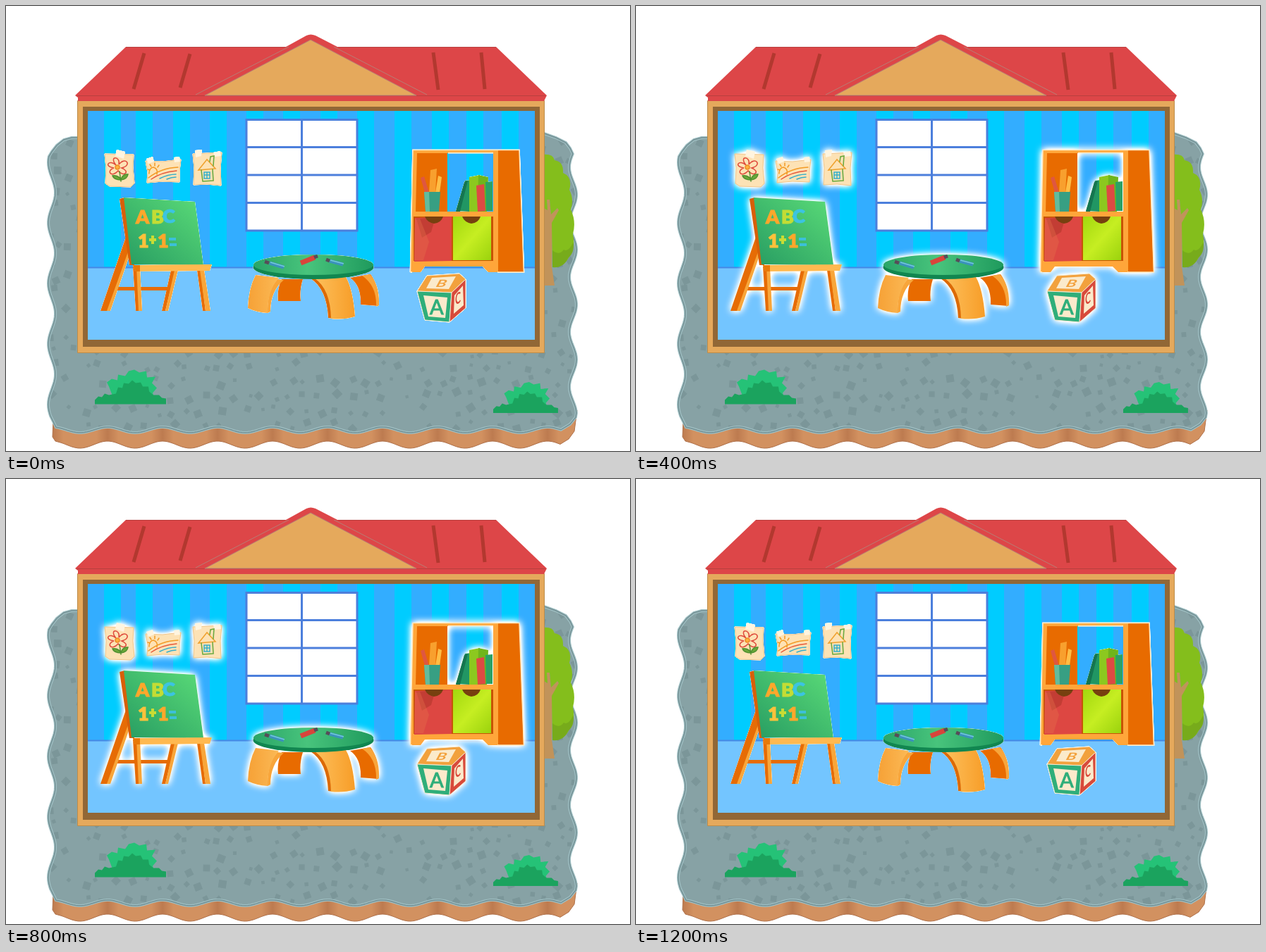
These frames come from a looping animation (885x632 px, 1300 ms). An HTML page:

```html
<!DOCTYPE html>
<html lang="en">
<head>
<meta charset="utf-8">
<title>Classroom</title>
<style>
html, body { margin: 0; width: 100%; height: 100%; overflow: hidden; background: #fff; }
svg { display: block; width: 100%; height: 100%; }
text { font-family: Lato, "Open Sans", sans-serif; font-weight: 900; }
</style>
</head>
<body>
<svg viewBox="0 0 885 632">
<defs>
  <filter id="glow" filterUnits="userSpaceOnUse" x="90" y="140" width="690" height="360" color-interpolation-filters="sRGB">
    <feGaussianBlur id="blur" in="SourceAlpha" stdDeviation=".5"/>
    <feColorMatrix values="0 0 0 0 1  0 0 0 0 1  0 0 0 0 1  0 0 0 2 0"/>
    <feMerge><feMergeNode/><feMergeNode in="SourceGraphic"/></feMerge>
  </filter>
  <linearGradient id="soilFill" gradientUnits="userSpaceOnUse" x1="66" x2="144" spreadMethod="repeat">
    <stop offset="0" stop-color="#bd7b50"/><stop offset=".2" stop-color="#d29160"/>
    <stop offset=".8" stop-color="#d29160"/><stop offset="1" stop-color="#bd7b50"/>
  </linearGradient>
  <linearGradient id="board" x1="0" y1="1" x2="1" y2="0">
    <stop stop-color="#279c62"/><stop offset="1" stop-color="#5bdc78"/>
  </linearGradient>
  <linearGradient id="wood"><stop stop-color="#f6a136"/><stop offset=".5" stop-color="#ffcb6c"/><stop offset="1" stop-color="#f79d28"/></linearGradient>
  <linearGradient id="lime" x2="1" y2="1"><stop stop-color="#a2d80e"/><stop offset=".5" stop-color="#c6ee22"/><stop offset="1" stop-color="#9bd30d"/></linearGradient>
  <linearGradient id="tabletop"><stop stop-color="#2aa568"/><stop offset=".45" stop-color="#48c47c"/><stop offset="1" stop-color="#1f9a5d"/></linearGradient>
  <clipPath id="room"><path d="M116 149H750V474H116Z"/></clipPath>
  <clipPath id="land"><path id="landClip"/></clipPath>
  <g id="bush">
    <path fill="#25c277" d="M28 45L20 24 17 18 24 13 32 15 33 7 43 9 48 2 56 0 63 4 73 2 74 11 86 10 81 19 88 26 82 33 85 42 80 47Z"/>
    <path fill="#1ba35e" d="M0 49V43L5 38 10 39 14 34 20 36 30 34 33 25 39 26 41 19 48 20 53 15 58 19 65 18 68 24 76 24 77 31 83 36 91 36 95 40 101 41V49Z"/>
  </g>
</defs>

<!-- Ground -->
<path id="soil" fill="url(#soilFill)" stroke="#b0714a"/>
<path id="grass" fill="#87a2a5"/>
<path id="stones" fill="#7b9699" clip-path="url(#land)"/>
<path id="rim" fill="none" stroke="#9fc0c4" stroke-width="4"/>
<path id="edge" fill="none" stroke="#748f93" stroke-width="1.5"/>

<!-- Tree -->
<path fill="#c1935a" d="M760 285L768 290 767 275 771 275 773 296 782 287 784 290 775 308 774 370 778 397H760Z"/>
<path fill="#84be1c" d="M760 211Q776 209 778 219Q791 221 790 237Q804 243 799 261Q806 275 801 289Q809 306 804 324Q808 344 799 355Q792 372 775 370L774 308 784 290 782 287 773 296 771 275H767L768 290 760 285Z"/>
<path fill="#77ab1b" d="M775 347Q785 355 791 346Q798 350 804 336Q807 350 797 358Q790 373 775 371Z"/>

<!-- House -->
<path fill="#e5a95c" stroke="#bd8c49" d="M101.500 134.500H763.500V492.500H101.500Z"/>
<path fill="#916736" d="M109 143H757V484H109Z"/>
<path fill="#dd4648" d="M98 127L170 58H397L426 42Q432 39 439 42L470 58H695L767 127 763 135H102V130Z"/>
<path fill="none" stroke="#b8403f" d="M100 127.500H765M170 58.500H396M471 58.500H695"/>
<path fill="none" stroke="#b77d74" d="M269 126L401 58M465 58L597 126"/>
<path fill="#e5a95c" stroke="#b77d74" d="M282 127L432 48 582 127Z"/>
<path stroke="#b2382f" stroke-width="5" d="M196 67L181 118M261 68L247 116M606 66L613 119M674 66L679 118"/>

<!-- Room -->
<path fill="#33adff" d="M116 149H750V372H116Z"/>
<path id="stripes" stroke="#00ccff" stroke-width="24"/>
<path fill="#73c5ff" d="M116 372H750V474H116Z"/>
<path stroke="#4688e4" stroke-width="2" d="M116 371.500H750"/>
<path fill="#fff" stroke="#4c7fdc" stroke-width="3" d="M341 161.500H498V319H341ZM419.500 161V319M341 200.500H498M341 240H498M341 279.500H498"/>

<g clip-path="url(#room)">
<g filter="url(#glow)">
  <!-- Drawings -->
  <g fill="#fde2b5" stroke="#efc489">
    <path d="M140 210L181 211 180 230 182 252 177 257 147 256 141 252 142 230Z"/>
    <path d="M198 220L222 221 248 218 246 234 246 250 222 249 200 251 201 236Z"/>
    <path d="M265 210L306 208 304 230 305 255 285 253 266 254 267 230Z"/>
  </g>
  <path fill="#fff4df" d="M157 204L169 207 167 217 155 213ZM199 217L208 214 210 221 202 224ZM238 215L246 214 247 221 239 222ZM268 205L278 204 277 213 269 215ZM294 208L304 206 305 213 296 214Z"/>
  <g fill="none" stroke-width="1.500" stroke-linecap="round">
    <path stroke="#df4b3c" d="M156 226C145 212 163 213 160 225C169 213 180 226 164 230C177 235 167 244 159 234C150 245 141 234 153 230C138 228 146 217 156 226Z"/>
    <circle cx="158" cy="229" r="3" fill="#ffb13c" stroke="#ed8c28"/>
    <path fill="#6aa83a" stroke="#4f9030" d="M161 235L163 249M163 247Q153 247 151 241Q160 240 163 247Q165 238 173 239Q172 246 163 247"/>
    <path stroke="#f39b25" d="M203 238Q203 230 209 229Q216 231 214 239M201 232L204 233M204 225L206 228M211 223V227M217 226L215 229M202 244Q220 230 244 229"/>
    <path stroke="#e75a3b" d="M206 246Q220 236 242 234"/>
    <path stroke="#35aeca" d="M218 245Q230 239 241 239M228 246Q235 243 241 243"/>
    <path stroke="#f0a12e" d="M273 233L285 218 297 231Z"/>
    <path stroke="#65a83c" d="M277 233L279 249 294 248 293 232M289 221L290 214 295 213 294 227"/>
    <path stroke="#35aeca" d="M281 236H289V245H281ZM285 236V245M281 240H289"/>
  </g>

  <!-- Easel -->
  <path fill="#e66c05" d="M170 328L177 342 145 433H134ZM180 370H186L189 433H184ZM234 375H240L226 433H221ZM271 375H276L283 433H279ZM153 399H237L235 404H152Z"/>
  <path fill="#f8a63a" d="M176 341L178 346 148 433H143ZM185 370H190L193 433H188ZM239 375H244L230 433H226ZM275 375H281L290 433H283Z"/>
  <path fill="#d85f08" d="M161 274L168 272 182 368 175 368Z"/>
  <path fill="url(#board)" d="M167 272L268 278 280 368 178 367Z"/>
  <path fill="#ffb950" d="M180 368L292 367 289 376 183 377Z"/>
  <path fill="#e87909" d="M180 368L190 368 190 377 183 377Z"/>
  <g font-size="27">
    <g fill="#ffa72b" stroke="#ffa72b"><text x="184" y="309">A</text><text x="215" y="343">1</text></g>
    <text x="206" y="309" fill="#c3dc35" stroke="#c3dc35">B</text>
    <text x="222" y="308" fill="#3cc4e2" stroke="#3cc4e2">C</text>
    <text x="187" y="343" fill="#ffc13b" stroke="#ffc13b">1</text>
    <path fill="none" stroke="#c8dc35" stroke-width="4" d="M203 332H213M208 326V338"/>
    <path fill="none" stroke="#3cc0d8" stroke-width="4" d="M231 331H241M232 339H242"/>
  </g>

  <!-- Table -->
  <path fill="#e86b00" d="M391 388Q384 403 386 419L418 419Q416 404 421 388ZM488 386Q504 397 503 424L528 426Q529 397 517 381Z"/>
  <path fill="#f8a53a" d="M516 381Q530 396 529 425L525 427Q526 397 505 383ZM385 388Q370 404 371 436L375 434Q375 405 394 389Z"/>
  <path fill="#dc6a06" d="M432 387Q455 402 457 443L464 444Q462 403 440 387Z"/>
  <path fill="url(#wood)" d="M354 382Q344 401 343 429Q355 435 371 436Q371 403 387 386ZM438 387Q460 402 461 444Q479 446 495 441Q492 402 482 385Z"/>
  <ellipse cx="436" cy="371" rx="85.500" ry="17" fill="#118650"/>
  <ellipse cx="436" cy="367.500" rx="85" ry="14.500" fill="url(#tabletop)"/>
  <g stroke-width="5">
    <path stroke="#3b91bc" d="M374 365L394 371M459 362L478 367"/>
    <path stroke="#d9443b" stroke-width="7" d="M418 365L438 357"/>
    <path stroke="#574c59" d="M367 363L373 365M454 360L459 362M437 357L442 355"/>
    <path stroke="#72c9da" stroke-width="1.500" d="M375 364L395 370M460 361L479 366"/>
  </g>

  <!-- Shelf -->
  <path fill="#e86b00" d="M581 208H626V293H580ZM697 205H728L734 378H697Z"/>
  <path fill="#ffa63a" fill-rule="evenodd" d="M577 204H698V378H684L676 370H594L588 378H573ZM583 209L581 292H691V209ZM580 299L578 362H691V299Z"/>
  <path fill="#c75305" d="M578 299H691V362H578Z"/>
  <path fill="#dd4742" d="M580 301L632 299V362L579 363Z"/>
  <path fill="#c33d34" d="M582 302L609 300 603 321 590 329Z"/>
  <path fill="#e5734a" d="M580 303L587 302 600 335 592 361H579Z" opacity=".35"/>
  <path fill="url(#lime)" d="M634 299H688V361H634Z"/>
  <path fill="#77400f" d="M594 299H620Q617 308 607 309Q597 307 594 299ZM647 299H673Q670 308 660 309Q650 307 647 299Z"/>
  <path fill="none" stroke="#ffe7bd" stroke-width="1.500" d="M576 378L573.500 377.500 577 204.500H728L734.500 378H697M627 208.500H691"/>
  <path fill="#df5740" d="M588 244L593 242 600 265H594Z"/>
  <path fill="#f8a02e" d="M602 233L611 231 609 265H600Z"/>
  <path fill="#ffbd45" d="M613 241L618 243 615 265H609Z"/>
  <path fill="#379f83" d="M593 264H616L614 292H595Z"/>
  <path fill="#63bc9c" d="M593 264H600L601 292H595Z"/>
  <path fill="#219663" d="M638 291L651 248 660 247 657 292Z"/>
  <path fill="#15754f" d="M650 250L655 248 644 292H638Z"/>
  <path fill="#8cc81f" d="M657 243L672 240 670 292H657Z"/>
  <path fill="#6fb51b" d="M670 240L684 243 682 292H669Z"/>
  <path fill="#dd4a43" d="M667 255L678 253 680 291 669 292Z"/>
  <path fill="#2aa266" d="M680 250L690 249V291H681Z"/>

  <!-- Block -->
  <g stroke="#f4ead2" stroke-linejoin="round">
    <path fill="#f2a13d" d="M583 405L597 383 643 380 652 388 632 407Z"/>
    <path fill="#2fae7a" d="M583 405L632 407 629 449 594 446Z"/>
    <path fill="#d84a3b" d="M632 407L652 388V429L629 449Z"/>
  </g>
  <path fill="#fbeacb" d="M604 386L638 384 628 402 596 401ZM592 411L626 414 623 443 599 441ZM636 411L648 397 649 425 635 437Z"/>
  <text x="601" y="438" font-size="29" fill="#2fae7a" style="font-weight:400" stroke="#2fae7a">A</text>
  <text transform="matrix(.55 -.3 0 1 637 425)" font-size="22" fill="#d84a3b" style="font-weight:700">C</text>
  <text transform="matrix(1 0 -.35 .65 608 399)" font-size="22" fill="#f2a13d" style="font-weight:700">B</text>
</g>
</g>

<use href="#bush" x="126" y="516.500"/>
<use href="#bush" transform="translate(691 534) scale(.91 .9)"/>
</svg>
<script>
const $ = id => document.getElementById(id);
const setPath = (id, d) => $(id).setAttribute("d", d);
const wave = (v, peak, period) => Math.cos(2 * Math.PI * (v - peak) / period);

function trace(from, to, point) {
  const pts = [], dir = Math.sign(to - from);
  for (let v = from; (to - v) * dir >= 0; v += 4 * dir) pts.push(point(v).map(n => n.toFixed(1)));
  return pts.join(" ");
}

const land = "M103 187L93 187 82 190 72 198 65 207 " +
  trace(214, 582, y => [65 - 5 * wave(y, 222, 86), y]) + " " +
  trace(71, 787, x => [x, 602 + 4 * wave(x, 105, 78)]) + " 800 594 808 584 " +
  trace(578, 210, y => [804 + 5 * wave(y, 268, 78), y]) + " 800 202 794 194 780 187 763 181";
for (const id of ["landClip", "grass", "rim", "edge"]) setPath(id, land);

setPath("soil", "M67 588L66 612 70 618 " +
  trace(78, 786, x => [x, 623 + 5 * wave(x, 105, 78)]) + " 798 615 806 604 810 574Z");

let seed = 7;
const rand = () => (seed = seed * 16807 % 2147483647) / 2147483647;
let stones = "";
for (let y = 190; y < 605; y += 21)
  for (let x = 62; x < 812; x += 21) {
    const px = x + rand() * 14, py = y + rand() * 14, r = 3 + rand() * 5, a = rand() * 1.6;
    if (rand() < .25) continue;
    const c = r * Math.cos(a), s = r * Math.sin(a);
    stones += `M${px + c} ${py + s}L${px - s} ${py + c} ${px - c} ${py - s} ${px + s} ${py - c}Z`;
  }
setPath("stones", stones);

const bands = [139, 184, 237, 289, 341, 393, 446, 498, 551, 604, 653, 703];
setPath("stripes", bands.map(x => `M${x + 12} 149V371`).join(""));

// The glow grows for six steps of 100 ms, then shrinks again.
let shown = -1;
function draw() {
  const step = Math.floor(performance.now() % 1300 / 100);
  const level = 6 - Math.abs(6 - step);
  if (level !== shown) $("blur").setAttribute("stdDeviation", .5 + 1.25 * level);
  shown = level;
  requestAnimationFrame(draw);
}
draw();
</script>
</body>
</html>
```
